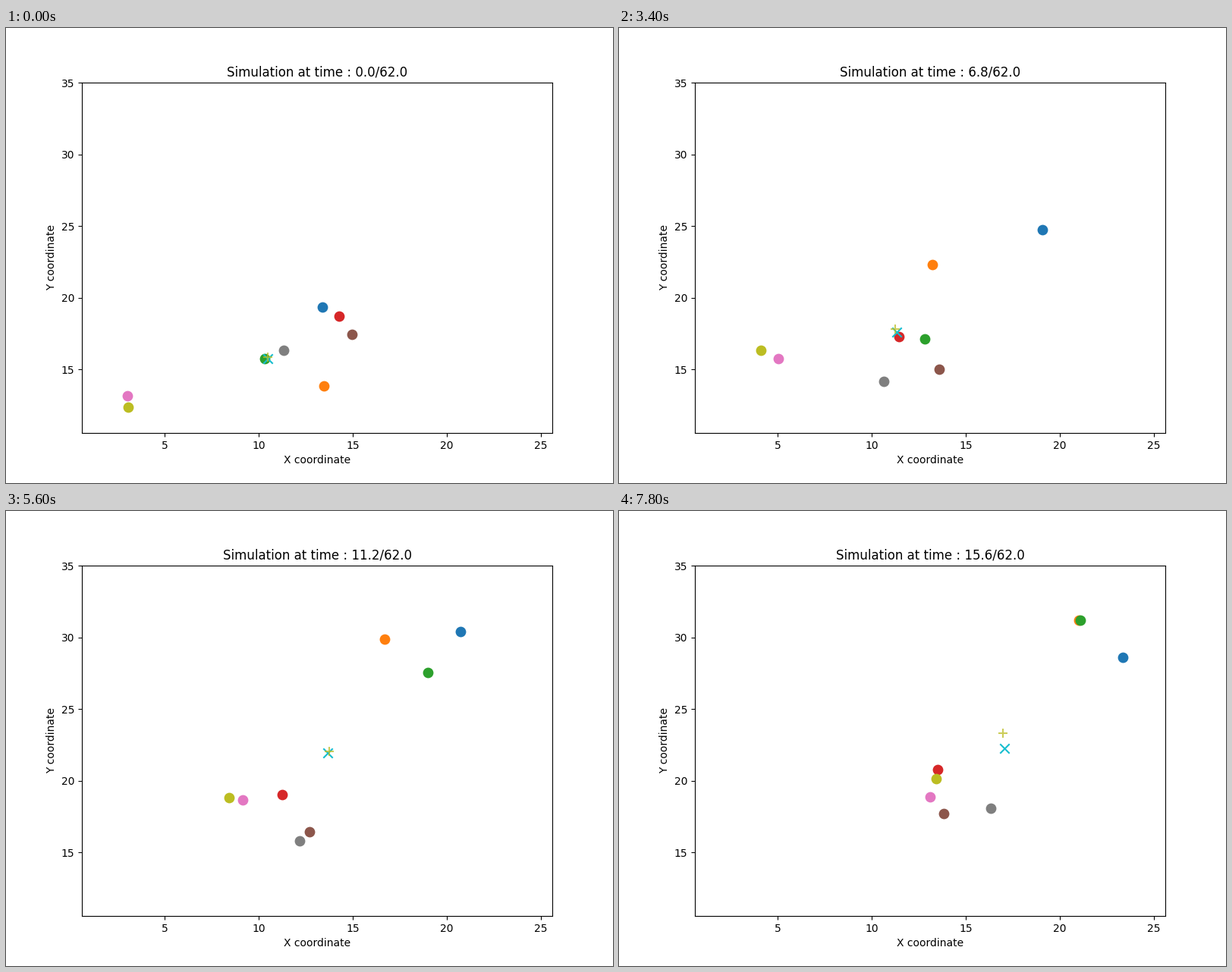
A matplotlib script for the animation above (8 s loop, 800 px wide and 600 px high).

```python
import matplotlib.pyplot as plt
import numpy as np
from matplotlib.animation import FuncAnimation

FRAMES, INTERVAL = 40, 200
STEP, END = 0.4, 62.0
XLIM, YLIM = (0.6, 25.6), (10.57, 35)

# Turning points in stage pixels: three agents roam fast, five drift slowly.
FAST_TIMES = 0, 1.2, 2.4, 4.2, 5.6, 7.0, 7.8
FAST = {
    "C0": [(417, 368), (403, 391), (476, 332), (603, 217),
           (599, 159), (584, 174), (664, 193)],
    "C1": [(419, 472), (417, 478), (428, 390), (412, 252),
           (499, 169), (620, 177), (606, 144)],
    "C2": [(341, 436), (391, 432), (402, 458), (431, 334),
           (556, 213), (621, 191), (608, 144)],
}
SLOW_TIMES = 0, 1.2, 2.4, 5.6, 7.8
SLOW = {
    "C3": [(439, 380), (412, 414), (386, 417), (364, 374), (420, 341)],
    "C5": [(456, 404), (449, 414), (437, 443), (400, 423), (428, 399)],
    "C6": [(160, 485), (133, 466), (166, 456), (312, 381), (410, 377)],
    "C7": [(366, 425), (383, 440), (360, 462), (387, 435), (490, 392)],
    "C8": [(161, 500), (126, 474), (149, 448), (294, 378), (418, 353)],
}


def spline(t, pts, s):
    """Natural cubic spline through pts at times t, sampled at s."""
    t, pts = np.array(t, float), np.array(pts, float)
    h = np.diff(t)[:, None]
    slope = np.diff(pts, axis=0) / h
    n = len(t)
    a, b = np.eye(n), np.zeros_like(pts)
    for i in range(1, n - 1):
        l, r = h[i - 1, 0], h[i, 0]
        a[i, i - 1:i + 2] = l, 2 * (l + r), r
        b[i] = 6 * (slope[i] - slope[i - 1])
    m = np.linalg.solve(a, b)
    k = np.clip(np.searchsorted(t, s, "right") - 1, 0, n - 2)
    u, h = (s - t[k])[:, None], h[k]
    return (pts[k] + u * (slope[k] - h * (2 * m[k] + m[k + 1]) / 6)
            + u**2 * m[k] / 2 + u**3 * (m[k + 1] - m[k]) / (6 * h))


def bump(t, peak, width):
    return np.exp(-((t - peak) / width) ** 2)


def to_data(p):
    """Stage pixels (y down) to axes coordinates."""
    x = XLIM[0] + (p[..., 0] - 100) / 620 * (XLIM[1] - XLIM[0])
    y = YLIM[1] - (p[..., 1] - 72) / 462 * (YLIM[1] - YLIM[0])
    return np.stack([x, y], axis=-1)


clock = np.arange(FRAMES) * INTERVAL / 1000
agents = np.array([spline(FAST_TIMES, p, clock) for p in FAST.values()]
                  + [spline(SLOW_TIMES, p, clock) for p in SLOW.values()])
center = agents.mean(axis=0)

# The estimate sways around the true centroid and twice falls behind it.
sway = -2.5 * np.cos(2 * np.pi * (clock - 1.2) / 4.4)
lag = 2 + 6 * bump(clock, 2.5, 0.9) + 18 * bump(clock, 7.8, 0.4)
guess = center + np.stack([sway, lag], axis=1)
tracks = to_data(np.concatenate([agents, [guess, center]]))

fig, ax = plt.subplots(figsize=(8, 6), dpi=100)
ax.set(xlim=XLIM, ylim=YLIM, xticks=range(5, 26, 5), yticks=range(15, 36, 5),
       xlabel="X coordinate", ylabel="Y coordinate")
title = ax.set_title("")

dots = [ax.scatter([], [], s=80, color=c) for c in [*FAST, *SLOW]]
dots.append(ax.scatter([], [], s=80, marker="x", color="C9"))
dots.append(ax.scatter([], [], s=80, marker="+", color="C8", alpha=0.75))


def draw(i):
    for dot, track in zip(dots, tracks):
        dot.set_offsets(track[i])
    title.set_text(f"Simulation at time : {i * STEP:.1f}/{END}")
    return [*dots, title]


anim = FuncAnimation(fig, draw, frames=FRAMES, interval=INTERVAL,
                     init_func=lambda: draw(0), repeat=True, repeat_delay=0)
plt.show()
```
